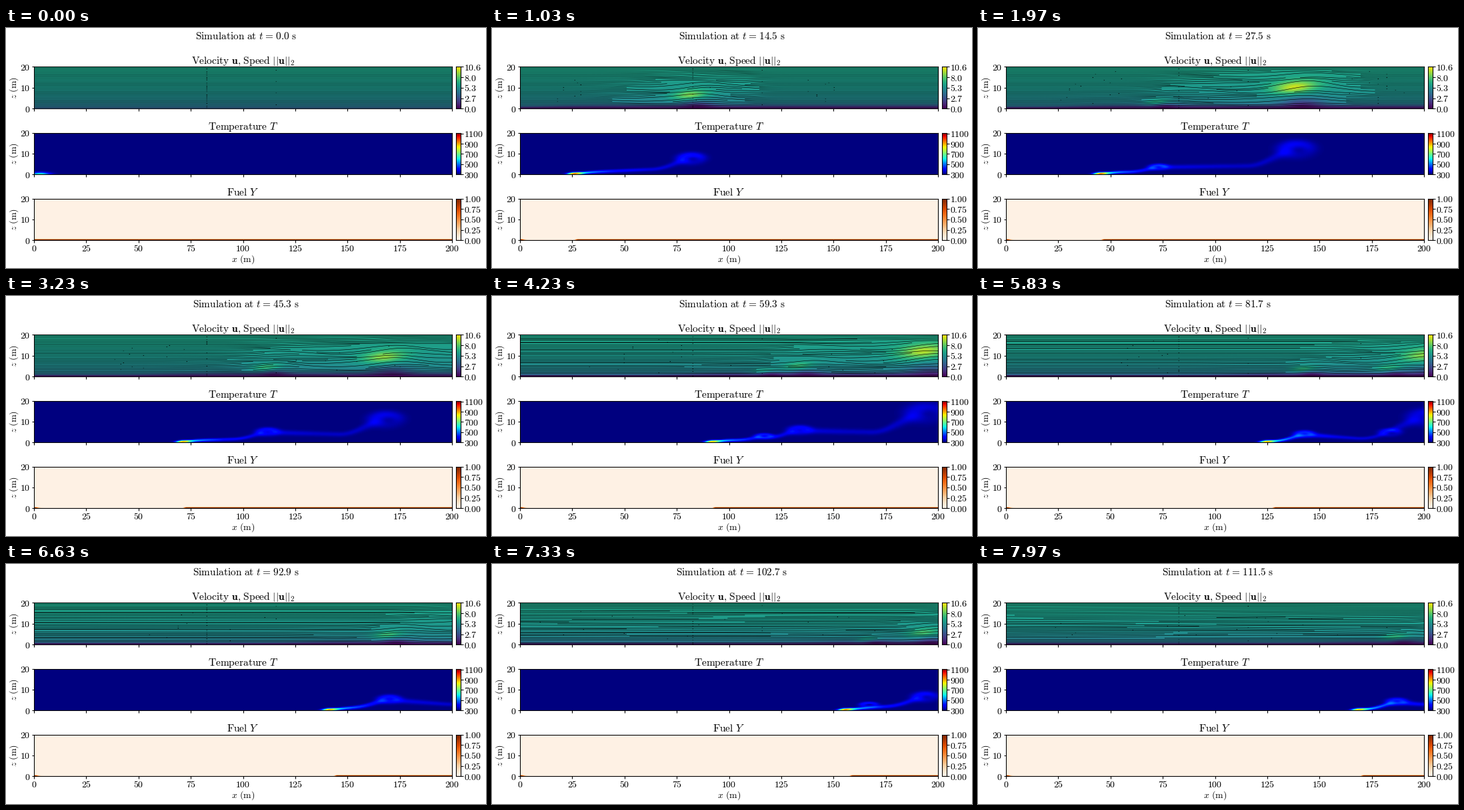
These frames come from a looping animation (720 px wide and 361 px high, 8000 ms). A matplotlib script:

```python
import numpy as np
import matplotlib.pyplot as plt
from matplotlib.animation import FuncAnimation
from matplotlib.collections import LineCollection

W, H = 720, 361
TICK = 25            # ms per drawn frame
STEPS = 240          # simulation steps per loop
LOOP = 8000
DT = 7 / 15          # simulated seconds per step
PT = 0.72            # points per pixel at 100 dpi

plt.rcParams["mathtext.fontset"] = "cm"
fig = plt.figure(figsize=(7.2, 3.61), dpi=100, facecolor="white")

# field grid
x = (np.arange(314) + 0.5) * 200 / 314
z = ((np.arange(64) + 0.5) * 20 / 64)[:, None]

# streamline grid: 30 x 30 cells, five samples per cell
N = 146
sx = np.linspace(0, 200, N)
col = np.rint(np.arange(N) / 5).astype(int)
q = np.linspace(-4, 24, 57)[:, None]
hump = np.sin(np.pi * np.clip(q, 0, 20) / 20)

# each puff: (time, x, z) way points
PUFFS = [
    [(0, 5, 1), (10, 58, 5), (20, 112, 10), (27.5, 139, 11.5),
     (45.3, 168.5, 10.5), (59.3, 194, 13.5), (72, 230, 15)],
    [(18, 50, 1.5), (27.5, 73, 3.3), (45.3, 112, 4.8), (59.3, 134, 5.6),
     (81.7, 201, 11.5), (92, 235, 13)],
    [(45, 84, 1), (59.3, 117, 2.8), (81.7, 184, 4.5), (95, 230, 6)],
    [(70, 116, 1.5), (81.7, 143, 3.8), (102.7, 194, 6.2), (116, 230, 7)],
    [(96, 152, 1.5), (111.5, 187, 4), (120, 208, 5)],
]


def sigmoid(v):
    return 0.5 * (1 + np.tanh(v / 2))


def active_puffs(t):
    out = []
    for keys in PUFFS:
        ts, xs, zs = zip(*keys)
        if ts[0] < t < ts[-1]:
            age = t - ts[0]
            power = min(1, age / 7) / (1 + age / 80)
            out.append((np.interp(t, ts, xs), np.interp(t, ts, zs), power))
    return sorted(out)


def speed(t, front, puffs):
    u = 6.2 * (z / 20) ** 0.14 + 0 * x
    grow = min(1, t / 5)
    depth = 0.7 + 0.75 * sigmoid((x - front + 6) / 8)
    u *= 1 - 0.85 * grow * np.exp(-(z / depth) ** 2)
    for px, pz, power in puffs:
        wx, wz = 4 + 0.6 * pz, 0.9 + 0.2 * pz
        dx, dz = x - px + 1, z - 0.88 * pz
        u += power * (1 + 0.4 * pz) * np.exp(
            -(dx / wx) ** 2 - ((dz - 0.08 * dx) / wz) ** 2)
        u *= 1 - min(0.85, 1.15 * power) * np.exp(
            -((x - px - 3) / (4.5 + 0.5 * pz)) ** 2
            - (z / (0.9 + 0.3 * pz)) ** 2)
    return u


def temperature(t, front, puffs):
    grow = min(1, t / 6)
    heat = (1 - grow) * 340 * np.exp(-((x - 3) / 4.5) ** 2 - (z / 0.9) ** 2)
    flick = 1 + 0.1 * np.sin(1.9 * t) + 0.07 * np.sin(4.3 * t + 1)
    core = 0.15 + 0.05 * np.clip(x - front, 0, 12)
    heat += grow * 420 * flick * np.exp(
        -((x - front - 5) / 3.2) ** 2 - ((z - core) / 0.55) ** 2)

    # plume ribbon from the flame through the puffs
    pts = [(front, 0.1), (front + 6, 0.3), (front + 14, 1.1)]
    end = front + 22
    for px, pz, power in puffs:
        a = 3 + 0.5 * pz
        for p in ((px - 2.2 * a, 0.35 * pz), (px - 0.4 * a, pz)):
            if p[0] > front + 15:
                pts.append(p)
        end = max(end, px)
    pts.sort()
    mid = np.interp(x, *zip(*pts))
    mid = np.convolve(np.pad(mid, 7, mode="edge"), np.ones(15) / 15, "valid")
    amp = np.interp(x - front, [0, 4, 10, 16, 24, 40, 70],
                    [0, 240, 260, 180, 115, 72, 50])
    amp = amp * sigmoid((end - x) / 1.5) * grow
    heat += amp * np.exp(-((z - mid) / (0.45 + 0.18 * mid)) ** 2)

    for px, pz, power in puffs:
        a, b = 3 + 0.5 * pz, 0.4 + 0.33 * pz
        dx, dz = (x - px) / a, (z - pz) / b
        ring = np.exp(-((np.hypot(dx, dz) - 0.7) / 0.5) ** 2)
        heat += power * (165 - 4 * pz) * ring * (
            0.6 + 0.4 * np.tanh(1.2 * dz - 0.3 * dx))
    return 300 + heat


def fuel(t):
    edge = np.interp(t, [0, 4, 27.5, 45.3, 59.3, 81.7, 102.7, 111.6],
                     [-4, 10.5, 45.4, 71.3, 92, 127.4, 157.6, 169.7])
    left = sigmoid((edge - 1) / 0.5) * np.exp(-(x / 2) ** 2)
    row = np.maximum(np.clip((x - edge) / 1.5, 0, 1), left)
    return 0.03 + 0.97 * row * np.clip((0.6 - z) / 0.4, 0, 1)


def seed_cells():
    """Cells in an inward spiral from the lower left corner."""
    cells = []
    for k in range(15):
        lo, hi = k, 29 - k
        cells += [(lo, c) for c in range(lo, hi + 1)]
        cells += [(r, hi) for r in range(lo + 1, hi + 1)]
        cells += [(hi, c) for c in range(hi - 1, lo - 1, -1)]
        cells += [(r, lo) for r in range(hi - 1, lo, -1)]
    return [(r, c) for r, c in cells if c in (0, 29) or c % 5 == 2]


SEEDS = seed_cells()


def flow_paths(t, front, puffs):
    """Height at each sx of the streamline labelled by each q."""
    late = sigmoid((t - 98) / 4)
    lift = 0.4 * late * np.sin(sx / 55 - t / 12 + 0.5 * q) * hump
    lead = front + 15
    for px, pz, power in puffs:
        layer = hump * np.exp(-((q - 0.8 * pz) / (2 + 0.7 * pz)) ** 2)
        s = power * pz / 12
        lift += 3.6 * s * layer * np.exp(
            -((sx - px - 6) / (6 + 0.8 * pz)) ** 2)
        lift -= 0.8 * s * layer * np.exp(-((sx - px + 24) / 18) ** 2)
        lead = max(lead, px)
    wake = sigmoid((sx - front - 22 - 1.2 * q) / 5) * sigmoid((lead + 30 - sx) / 3)
    lift += 0.6 * min(1, t / 5) * wake * hump * np.sin(
        0.09 * sx - 0.3 * t + 0.95 * q)
    return np.maximum.accumulate(q + lift, axis=0)


def streamlines(paths):
    used = np.zeros((30, 30), bool)
    label = np.arange(len(q))
    lines, tips = [], []
    for r, c in SEEDS:
        if used[r, c]:
            continue
        i = 5 * c
        s = np.interp(r * 20 / 29, paths[:, i], label)
        k = min(int(s), len(q) - 2)
        line = paths[k] + (s - k) * (paths[k + 1] - paths[k])
        row = np.rint(line * 1.45).astype(int)
        safe = np.clip(row, 0, 29)
        stops = np.flatnonzero((row != safe) | used[safe, col])
        j = np.searchsorted(stops, i)
        lo = stops[j - 1] + 1 if j else 0
        hi = stops[j] if j < len(stops) else N
        if hi - lo < 18:
            continue
        used[safe[lo:hi], col[lo:hi]] = True
        lines.append(np.column_stack([sx[lo:hi], line[lo:hi]]))
        m = lo + int((hi - lo) * (0.58 if r % 8 == 3 else 0.415))
        tips.append((sx[m], line[m]))
    return lines, np.array(tips)


def box(left, top, width):
    ax = fig.add_axes([left / W, 1 - (top + 62.8) / H, width / W, 62.8 / H])
    for side in ax.spines.values():
        side.set_linewidth(1.1 * PT)
    ax.tick_params(length=3.5 * PT, width=1.1 * PT, pad=1.8 * PT,
                   labelsize=14 * PT)
    return ax


def text(px, py, s, size, **kw):
    return fig.text(px / W, 1 - py / H, s, fontsize=size * PT, ha="center", **kw)


def panel(top, title, cmap, vmin, vmax, ticks, fmt, last=False):
    ax = box(42, top, 627)
    im = ax.imshow(np.zeros((64, 314)), cmap=cmap, vmin=vmin, vmax=vmax,
                   extent=(0, 200, 0, 20), origin="lower", aspect="auto",
                   interpolation="bilinear")
    xt = range(0, 201, 25)
    ax.set_xticks(xt, [f"${v}$" if last else "" for v in xt])
    ax.set_yticks([0, 10, 20], ["$0$", "$10$", "$20$"])
    ax.set_xlim(0, 200)
    ax.set_ylim(0, 20)
    text(12.5, top + 32, r"$z\ \mathrm{(m)}$", 14, rotation=90, va="center")
    text(355.5, top - 4.6, title, 15.5, va="baseline")

    bar = box(675, top, 7)
    bar.imshow(np.linspace(0, 1, 256)[:, None], cmap=cmap, origin="lower",
               extent=(0, 1, vmin, vmax), aspect="auto")
    bar.set_xticks([])
    bar.yaxis.tick_right()
    bar.set_yticks(ticks, ["$" + fmt.format(v) + "$" for v in ticks])
    return ax, im


wind_ax, wind_im = panel(
    58.5, r"$\mathrm{Velocity}\ \mathbf{u}\mathrm{{,}\ Speed}\ ||\mathbf{u}||_2$",
    "viridis", 0, 10.62, np.linspace(0, 10.62, 5), "{:.1f}")
_, heat_im = panel(157.5, r"$\mathrm{Temperature}\ T$", "jet", 300, 1115,
                   range(300, 1101, 200), "{}")
_, fuel_im = panel(256.5, r"$\mathrm{Fuel}\ Y$", "Oranges", 0, 1,
                   np.linspace(0, 1, 5), "{:.2f}", last=True)
text(355.5, 352, r"$x\ \mathrm{(m)}$", 14, va="baseline")
clock = text(359.5, 17, "", 15.4, va="baseline")

lines_art = LineCollection([], colors="black", linewidths=0.6 * PT)
lines_art.set_snap(False)
wind_ax.add_collection(lines_art, autolim=False)
tips_art, = wind_ax.plot([], [], ">", color="black", ms=1.4 * PT, mew=0)


def draw(i):
    step = int((i * TICK + 17) * STEPS / LOOP)
    t = step * DT
    front = 1.47 * t
    puffs = active_puffs(t)
    clock.set_text(r"$\mathrm{Simulation\ at}\ t\hspace{0.08}=\hspace{0.08}"
                   rf"{t:.1f}\ \mathrm{{s}}$")
    wind_im.set_data(speed(t, front, puffs))
    heat_im.set_data(temperature(t, front, puffs))
    fuel_im.set_data(fuel(t))
    lines, tips = streamlines(flow_paths(t, front, puffs))
    lines_art.set_segments(lines)
    tips_art.set_data(tips[:, 0], tips[:, 1])
    return wind_im, heat_im, fuel_im, lines_art, tips_art, clock


anim = FuncAnimation(fig, draw, frames=LOOP // TICK, interval=TICK,
                     repeat=True, repeat_delay=0, blit=False)
plt.show()
```
